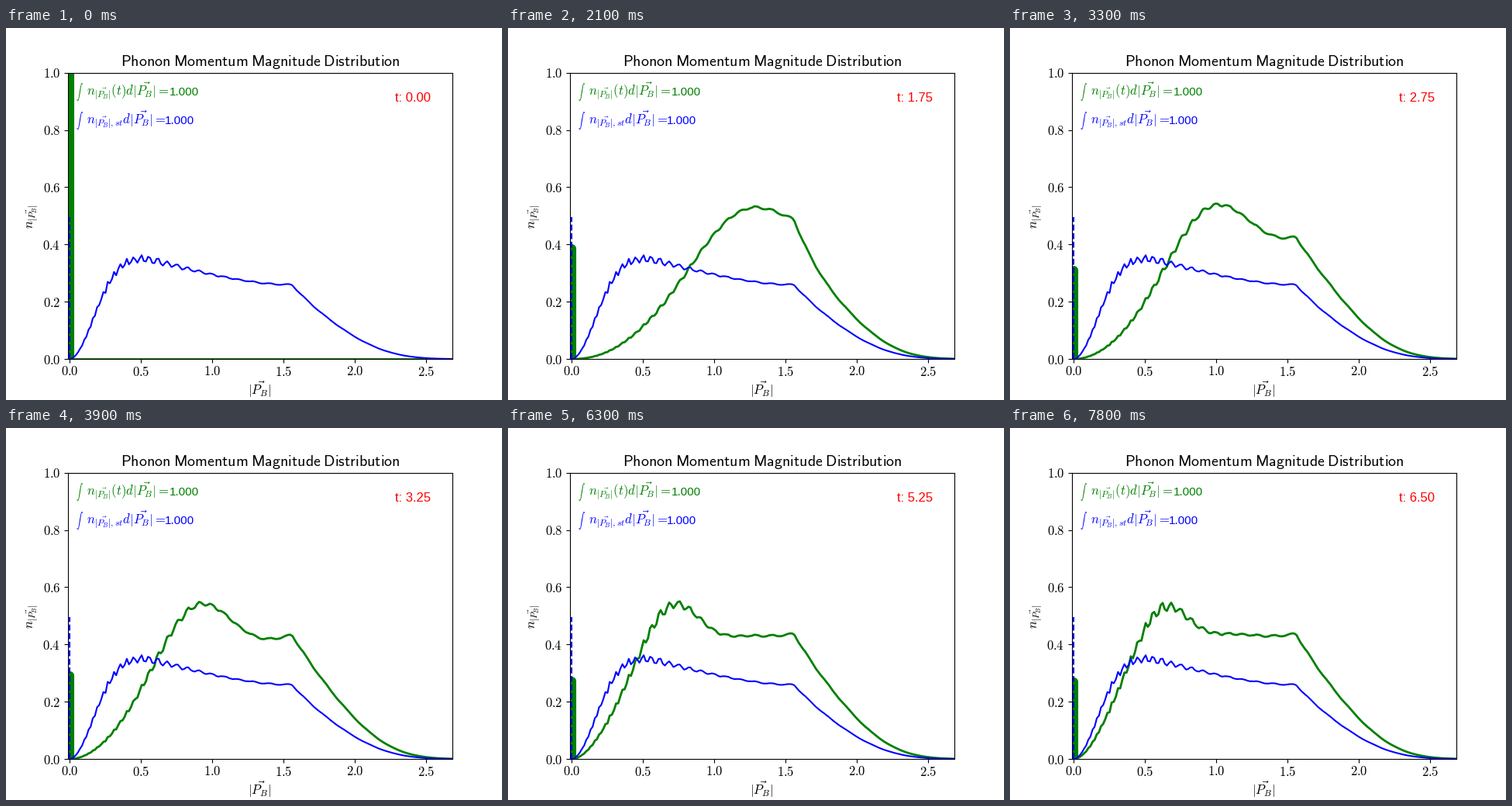
Recreate the animation shown at these times as a matplotlib script. Size 640 by 480 pixels, loop 8 s.

```python
import numpy as np
import matplotlib.pyplot as plt
from matplotlib.animation import FuncAnimation

plt.rcParams.update({"font.size": 12, "mathtext.fontset": "cm",
                     "font.family": "Liberation Sans"})

WIDTH, HEIGHT = 640, 480
STEP_TIME = 0.25
TICKS_PER_STEP = 3
DK = 0.0149  # momentum bin width
EDGE = 1.56  # momentum where the plateau ends


def stationary(k):
    """Rise, sloping plateau and cutoff, with a ripple that slows with k."""
    rise = 1 - np.exp(-(k / 0.262) ** 1.95)
    plateau = 0.26 + 0.1 * np.maximum(1.5 - k, 0) ** 1.5
    beyond = np.maximum(k - EDGE, 0)
    cutoff = np.exp(-2.2 * beyond - 2.7 * beyond ** 3)
    wave = np.cos(2 * np.pi * 14.6 * np.log((k + 0.3) / 0.61))
    depth = 0.035 * np.exp(-(k / 0.8) ** 4) + 0.007
    jitter = np.random.default_rng(4).normal(0, 0.15, k.size)
    return rise * plateau * cutoff * (1 + depth * (wave + jitter))


def gain(k, t):
    """Damped oscillation of each mode towards its final occupation."""
    phase = 0.87 * t * k ** 2
    damping = np.exp(-0.4 * phase - 0.035 * phase ** 2 - 0.014 * t ** 2)
    return (1.2 + 0.31 * k) * (1 - damping * np.cos(phase))


def condensate(t):
    return 0.27 + 0.73 * np.exp(-1.05 * t)


def label(x, y, text, **style):
    """Text with its baseline at a pixel position from the top left."""
    return fig.text(x / WIDTH, 1 - y / HEIGHT, text, va="baseline", **style)


def integral(y, end, subscript, argument, color):
    fig.text(90 / WIDTH, 1 - (y - 4.5) / HEIGHT, r"$\int$", fontsize=6,
             va="center", color=color)
    label(104, y, rf"$n_{{{P}{subscript}}}{argument}d{P}=$", color=color)
    label(end, y, "1.000", fontsize=11, ha="right", color=color)


k = np.arange(1, 182) * DK
steady = stationary(k)

fig = plt.figure(figsize=(WIDTH / 100, HEIGHT / 100), dpi=100)
ax = fig.add_axes([0.125, 0.11, 0.775, 0.77])
ax.set_xlim(-0.01, 2.685)
ax.set_ylim(0, 1)
for axis, step in ((ax.xaxis, 0.5), (ax.yaxis, 0.2)):
    ticks = np.arange(6) * step
    axis.set_ticks(ticks, labels=[rf"$\mathrm{{{v:.1f}}}$" for v in ticks])
ax.tick_params(axis="x", pad=2.2)

P = r"|\vec{P_B}|"
title = "Phonon Momentum Magnitude Distribution".replace(" ", r"\hspace{0.25}")
ax.set_title(rf"$\mathsf{{{title}}}$", fontsize=14.4)
label(327, 473, f"${P}$", ha="center")
label(36, 243, f"$n_{{{P}}}$", ha="center", rotation=90, rotation_mode="anchor")
integral(87, 248.5, "", "(t)", "green")
integral(124, 243.5, ",st", "", "blue")
clock = label(502, 95, "", color="red")

spike, = ax.plot([], [], color="green", lw=8, solid_capstyle="round")
evolving, = ax.plot([], [], color="green", lw=2)
ax.plot([0, 0], [0, 0.497], "b--", lw=1.5)
ax.plot(k, steady, "b-", lw=1.5)


def update(frame):
    t = frame // TICKS_PER_STEP * STEP_TIME
    evolving.set_data(k, steady * gain(k, t))
    spike.set_data([0, 0], [0, condensate(t)])
    clock.set_text(f"t: {t:.2f}")
    return spike, evolving, clock


anim = FuncAnimation(fig, update, frames=80, interval=100, repeat=True,
                     repeat_delay=0, blit=False)
plt.show()
```
